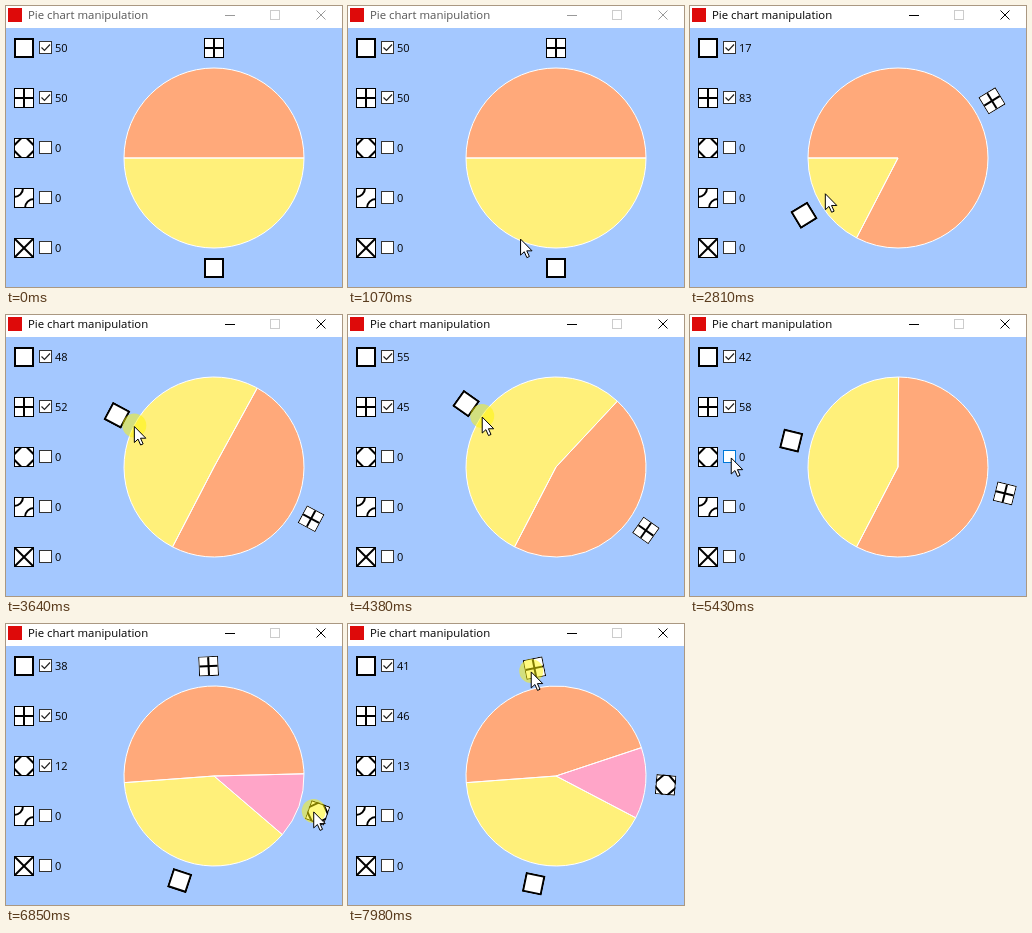
An HTML page with a canvas for the animation above (8000 ms loop, 336 by 281 pixels).

```html
<!DOCTYPE html>
<html lang="en">
<head>
<meta charset="utf-8">
<title>Pie chart manipulation</title>
<style>
  html, body { margin: 0; width: 100%; height: 100%; overflow: hidden; background: #a4c8ff; }
  canvas { display: block; }
</style>
</head>
<body>
<canvas id="stage" width="336" height="281"></canvas>
<script>
const ctx = document.getElementById('stage').getContext('2d');
const LOOP = 8000, CX = 208, CY = 152, R = 90, ICON_R = 110, TAU = 2 * Math.PI;
const ENTER = 670, ACTIVATE = 1840, LABEL_LAG = 16;
const COLORS = ['#fff07a', '#ffa97a', '#ffa5c8'];
const rad = deg => deg * Math.PI / 180;

// Eased pointer moves about the pie centre; `press` is the sector held meanwhile
let last = { angle: 8, r: 129 };
function move(from, to, angle, r, { bulge = 0, press = -1 } = {}) {
  return last = { from, to, angle, r, bulge, press, a0: last.angle, r0: last.r };
}
const moves = [
  move(ENTER, 950, 100, 80),
  move(950, 1640, 266.8, 107, { bulge: 25 }),
  move(ACTIVATE, 2400, 325.5, 107, { press: 1 }),
  move(2400, 2670, 374, 12),
  move(2670, 2810, 513.8, 81),
  move(2810, 3140, 507.6, 110),
  move(3290, 3904, 605.4, 76, { press: 0 }),
  move(3904, 4750, 552.8, 98, { press: 0 }),
  move(4800, 5350, 543.1, 167),
  move(5510, 5630, 543.1, 167, { press: 2 }),
  move(5630, 6370, 418.2, 111, { bulge: -77 }),
  move(6370, 6850, 379.8, 106, { press: 2 }),
  move(6850, 7180, 379.8, 106, { press: 2 }),
  move(7180, 7690, 265.1, 107, { bulge: -20 }),
  move(7720, LOOP, 256.5, 107, { press: 1 })
];

function progress(m, t) {
  const u = Math.min(1, Math.max(0, (t - m.from) / (m.to - m.from)));
  return u * u * (3 - 2 * u);
}

function pointerAt(t) {
  const m = moves.findLast(m => t >= m.from);
  if (!m) return null;
  const s = progress(m, t);
  const a = rad(m.a0 + (m.angle - m.a0) * s);
  const r = m.r0 + (m.r - m.r0) * s + m.bulge * Math.sin(Math.PI * s);
  return { x: CX + r * Math.cos(a), y: CY + r * Math.sin(a), down: m.press >= 0 && t < m.to };
}

const sumBefore = (v, i) => v.slice(0, i).reduce((a, b) => a + b, 0);

// Pressing an empty sector adds it. A drag keeps the sector's first edge,
// and the other sectors share the rest in proportion.
function pieAt(t) {
  let v = [0.5, 0.5, 0], start = 0;
  for (const m of moves) {
    const i = m.press;
    if (i < 0 || t < m.from) continue;
    const added = v[i] === 0;
    const edge = start + 360 * sumBefore(v, i);
    const size = added ? 0.33 : v[i] + (m.angle - m.a0) * progress(m, t) / 180;
    const k = (1 - size) / (1 - v[i]);
    v = v.map((x, j) => j === i ? size : x * k);
    if (!added) start = edge - 360 * sumBefore(v, i);
  }
  return { v, start };
}

function line(color, width, ...points) {
  ctx.strokeStyle = color;
  ctx.lineWidth = width;
  ctx.beginPath();
  for (const [x, y] of points) ctx.lineTo(x, y);
  ctx.stroke();
}

const symbols = [
  () => ctx.strokeRect(-9, -9, 18, 18),
  () => { line('#000', 2, [-9, 0], [9, 0]); line('#000', 2, [0, -9], [0, 9]); },
  () => line('#000', 2, [0, -12.5], [12.5, 0], [0, 12.5], [-12.5, 0], [0, -12.5]),
  () => {
    for (const s of [-1, 1]) {
      ctx.beginPath();
      ctx.arc(10 * s, 10 * s, 9, 0, TAU);
      ctx.stroke();
    }
  },
  () => { line('#000', 2, [-9, -9], [9, 9]); line('#000', 2, [9, -9], [-9, 9]); }
];

function icon(kind, x, y, turn = 0) {
  ctx.save();
  ctx.translate(x, y);
  ctx.rotate(rad(turn));
  ctx.beginPath();
  ctx.rect(-10, -10, 20, 20);
  ctx.clip();
  ctx.fillStyle = '#fff';
  ctx.fill();
  ctx.strokeStyle = '#000';
  ctx.lineWidth = 1;
  ctx.strokeRect(-9.5, -9.5, 19, 19);
  ctx.lineWidth = 2;
  symbols[kind]();
  ctx.restore();
}

function titleBar(active) {
  ctx.fillStyle = '#fff';
  ctx.fillRect(0, 0, 336, 22);
  ctx.fillStyle = '#de0a0a';
  ctx.fillRect(2, 2, 14, 14);
  ctx.fillStyle = active ? '#000' : '#555';
  ctx.font = '11.4px "Open Sans", sans-serif';
  ctx.fillText('Pie chart manipulation', 22, 13);
  const ink = active ? '#000' : '#999';
  line(ink, 1, [219, 9.5], [229, 9.5]);
  line(ink, 1, [310.5, 4.5], [319.5, 13.5]);
  line(ink, 1, [319.5, 4.5], [310.5, 13.5]);
  ctx.strokeStyle = '#ccc';
  ctx.strokeRect(264.5, 4.5, 9, 9);
}

function sidebar(t, mouse) {
  const { v } = pieAt(t - LABEL_LAG);
  const labels = [...v.map(x => Math.round(x * 100)), 0, 0];
  labels[1] = 100 - labels[0] - labels[2];
  ctx.font = '11px "Open Sans", sans-serif';
  labels.forEach((n, i) => {
    const y = 42 + 50 * i;
    const hover = mouse && Math.abs(mouse.x - 39.5) < 6.5 && Math.abs(mouse.y - y) < 6.5;
    icon(i, 18, y);
    ctx.fillStyle = '#fff';
    ctx.fillRect(33, y - 7, 13, 13);
    ctx.strokeStyle = hover ? '#0078d7' : '#333';
    ctx.lineWidth = 1;
    ctx.strokeRect(33.5, y - 6.5, 12, 12);
    if (v[i] > 0) line('#222', 1.2, [35.5, y - 0.5], [38.5, y + 2.5], [44, y - 3.5]);
    ctx.fillStyle = '#000';
    ctx.fillText(n, 49, y + 4);
  });
}

function pie(t) {
  const { v, start } = pieAt(t);
  let a = start;
  const parts = v.map((x, i) => ({ i, from: a, to: a += x * 360 })).filter(p => v[p.i] > 0);
  ctx.strokeStyle = '#fff';
  ctx.lineWidth = 1;
  ctx.lineJoin = 'round';
  for (const draw of ['fill', 'stroke'])
    for (const { i, from, to } of parts) {
      ctx.fillStyle = COLORS[i];
      ctx.beginPath();
      ctx.moveTo(CX, CY);
      ctx.arc(CX, CY, R, rad(from), rad(to));
      ctx.closePath();
      ctx[draw]();
    }
  ctx.lineJoin = 'miter';
  for (const { i, from, to } of parts) {
    const mid = (from + to) / 2;
    icon(i, CX + ICON_R * Math.cos(rad(mid)), CY + ICON_R * Math.sin(rad(mid)), mid);
  }
}

const arrow = new Path2D('M0 0V16L3.7 12.6L6.3 18.5L8.8 17.4L6.2 11.7H11.5Z');

function pointer({ x, y, down }) {
  ctx.save();
  ctx.translate(x, y);
  if (down) {
    ctx.fillStyle = 'rgba(255, 245, 0, .5)';
    ctx.beginPath();
    ctx.arc(0, -1, 12, 0, TAU);
    ctx.fill();
  }
  ctx.fillStyle = '#fff';
  ctx.strokeStyle = '#000';
  ctx.lineWidth = 1;
  ctx.fill(arrow);
  ctx.stroke(arrow);
  ctx.restore();
}

function frame() {
  const t = performance.now() % LOOP;
  const mouse = pointerAt(t);
  ctx.fillStyle = '#a4c8ff';
  ctx.fillRect(0, 0, 336, 281);
  titleBar(t >= ACTIVATE);
  sidebar(t, mouse);
  pie(t);
  if (mouse) pointer(mouse);
  requestAnimationFrame(frame);
}
frame();
</script>
</body>
</html>
```
